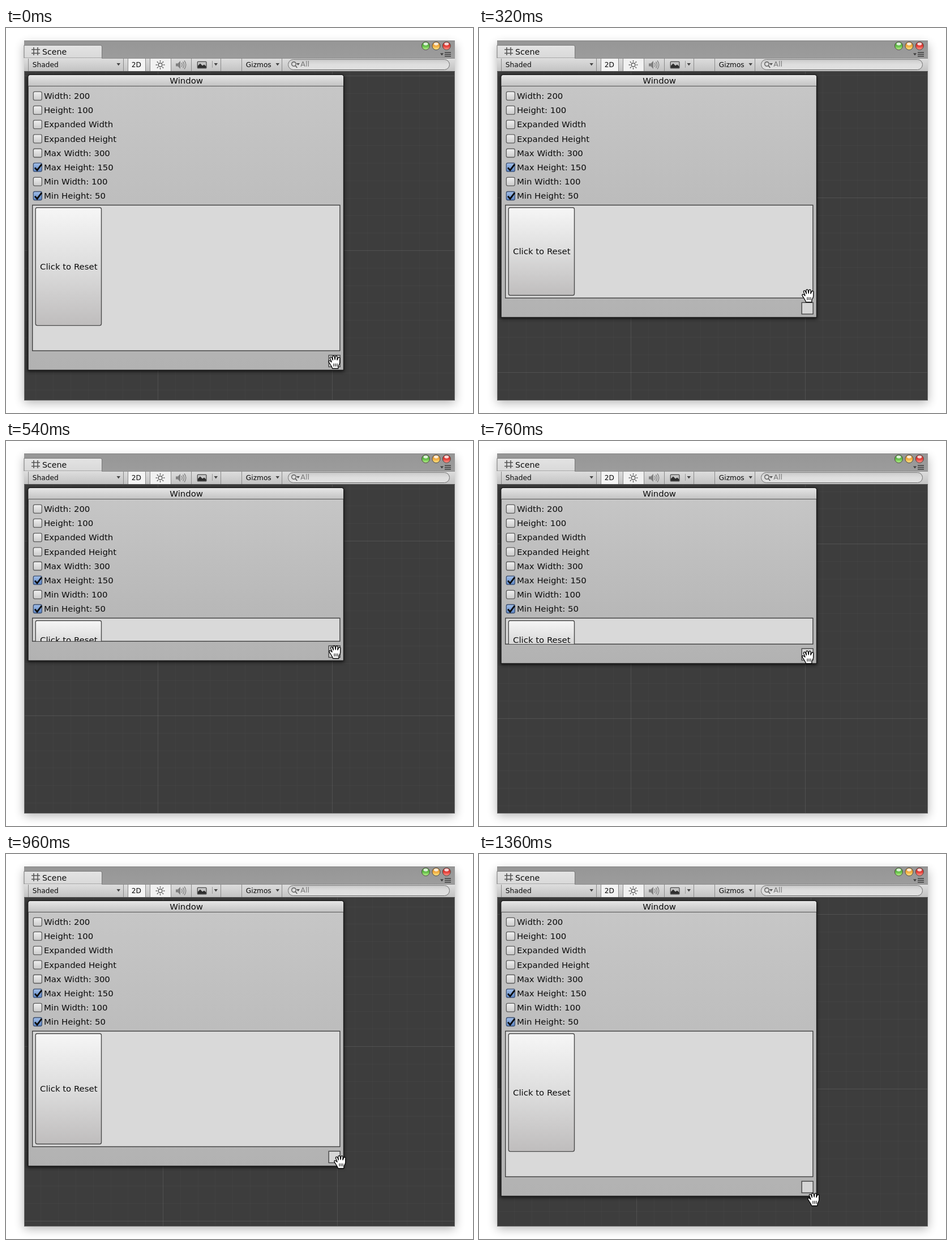
Recreate the animation shown at these times as an HTML page. Size 825x679 px, loop 1.38 s.

```html
<!DOCTYPE html>
<html lang="en">
<head>
<meta charset="utf-8">
<title>Resizable window</title>
<style>
  html, body { margin: 0; width: 100%; height: 100%; overflow: hidden; background: #fff; }
  svg { display: block; }
  text { font-family: "DejaVu Sans", Verdana, sans-serif; font-size: 14.9px; fill: #0c0c0c; }
  .tool text { font-size: 12.2px; }
  .mid { text-anchor: middle; }
  .sep { stroke: #8a8a8a; fill: none; }
  .icon { stroke: #5c5c5c; fill: none; }
</style>
</head>
<body>
<svg width="825" height="679" viewBox="0 0 825 679">
  <defs id="defs">
    <filter id="soft" x="-10%" y="-10%" width="120%" height="120%"><feGaussianBlur stdDeviation="9"/></filter>
    <filter id="near" x="-10%" y="-10%" width="120%" height="120%"><feGaussianBlur stdDeviation="3"/></filter>
    <clipPath id="scene"><rect x="33" y="77" width="759" height="579"/></clipPath>
    <clipPath id="boxClip"><rect id="clipRect" x="47" y="313" width="542" height="256"/></clipPath>
  </defs>

  <!-- outer frame -->
  <rect x="32" y="29" width="761" height="632" fill="#000" opacity=".3" filter="url(#soft)"/>
  <rect x="32" y="22" width="761" height="635" fill="#6c6c6c"/>
  <rect x="32" y="22" width="761" height="31" fill="url(#bar)"/>
  <path d="M32 22.5H793" stroke="#858585"/>
  <path d="M32 53V30.5H167Q169.5 30.5 169.5 33V53Z" fill="url(#tab)" stroke="#777"/>
  <path d="M49 34V48M56 34V48M45 38H60M45 44.5H60" stroke="#555" stroke-width="1.6"/>
  <text x="63.9" y="46.5" style="font-size:14.2px">Scene</text>
  <g id="lights"></g>
  <path d="M767 44.5h6l-3 4zM775 42.5h11v1.5h-11zM775 45.7h11v1.5h-11zM775 49h11v1.5h-11z" fill="#3c3c3c"/>

  <!-- toolbar -->
  <g class="tool">
    <rect x="32" y="53" width="761" height="23" fill="url(#tool)"/>
    <path d="M169 53.5H793" stroke="#8a8a8a"/>
    <rect x="216" y="54" width="30" height="22" fill="#f4f4f4"/>
    <rect x="255" y="54" width="36" height="22" fill="#f1f1f1"/>
    <path class="sep" d="M39.5 54V76M207.5 54V76M215.5 54V76M246.5 54V76M254.5 54V76M291.5 54V76M327.5 54V76M379.5 54V76M416.5 54V76M487.5 54V76"/>
    <path d="M364.5 58V70" stroke="#999"/>
    <path d="M195.5 62h6.5l-3.25 4.5zM367.5 62h6.5l-3.25 4.5zM476.5 62h6.5l-3.25 4.5z" fill="#444"/>
    <text x="46.8" y="69">Shaded</text>
    <text x="221.8" y="69">2D</text>
    <text x="423.8" y="69">Gizmos</text>
    <circle cx="272.5" cy="65" r="3.3" class="icon" stroke-width="1.4"/>
    <g id="rays" class="icon" stroke-width="1.4"></g>
    <path d="M300 62.500h3.500l4.500-4.500v14l-4.500-4.500h-3.500z" fill="#808080"/>
    <path fill="none" stroke="#808080" stroke-width="1.3" d="M310 61.5q2.500 3.500 0 7M312.500 59.5q4 5.500 0 11M315 57.500q5.500 7.500 0 15"/>
    <rect x="338.3" y="59.3" width="15.600" height="11.600" rx="1" fill="#c4c4c4" stroke="#4c4c4c" stroke-width="1.300"/>
    <path d="M339 70.500v-4l4-4 4 4 3-2 3.500 3v3z" fill="#2e2e2e"/>
    <rect x="498.5" y="55.5" width="285" height="18" rx="9" fill="url(#field)" stroke="#717171"/>
    <circle cx="508.5" cy="63.5" r="3.8" class="icon" stroke-width="1.4"/>
    <path class="icon" stroke-width="1.6" d="M511.3 66.5l3 3.5"/>
    <path d="M513 62h6l-3 4z" fill="#555"/>
    <text x="520.3" y="68" style="font-size:12.6px;fill:#777">All</text>
    <path d="M32 76.5H793" stroke="#505050"/>
  </g>

  <!-- scene view -->
  <g clip-path="url(#scene)">
    <rect x="33" y="77" width="759" height="579" fill="#3d3d3d"/>
    <path id="minor" stroke="#fff" stroke-opacity=".025"/>
    <path id="major" stroke="#fff" stroke-opacity=".1"/>
    <rect id="shade" x="38" y="84" width="559" height="523" fill="#000" opacity=".7" filter="url(#near)"/>
    <path id="body" fill="url(#panel)" stroke="#1c1c1c" stroke-width="1.4"/>
    <path d="M39.5 102.5V86.5Q39.5 83 43 83H592.5Q596 83 596 86.5V102.5Z" fill="url(#title)"/>
    <path d="M39 102.5H596" stroke="#555"/>
    <text class="mid" x="318.6" y="98">Window</text>
    <g id="options"></g>
    <rect id="box" x="46.7" y="312.4" width="543.2" fill="#d9d9d9" stroke="#3e3e3e" stroke-width="1.4"/>
    <g clip-path="url(#boxClip)">
      <rect id="button" x="52.2" y="316.8" width="116.3" rx="3" fill="url(#btn)" stroke="#4a4a4a" stroke-width="1.4"/>
      <text id="label" class="mid" x="110.8">Click to Reset</text>
    </g>
    <rect id="grip" x="570.2" width="20" height="20.3" fill="#d6d6d6" stroke="#444" stroke-width="1.4"/>
  </g>

  <g id="hand" stroke-linejoin="round" stroke-linecap="round">
    <path fill="#fff" stroke="#000" stroke-width="1.3" d="M-4.5 11.5C-4.5 9-7 6.5-8.5 3.8C-9.8 1.5-11.6 0-11-1.5C-10.3-3-8-2.5-6 .2C-6.2-3-9-6-8.6-7.6C-8-9.4-6-9.2-5-6.8L-3.6-3.3L-4.2-8.8C-4.2-11.3-1.2-11.6-.7-9.2L.1-4L.8-9.2C1.3-11.4 4.2-11 4.1-8.7L3.9-3.4L5.7-7.2C6.7-9 9.2-8.2 8.9-6.2C8.5-4 8.8-1.5 8.7 1C8.4 4 6.5 5.5 6 8L5.8 11.5Z"/>
    <path fill="none" stroke="#000" stroke-width="1.1" d="M-2 3V7.500M1 3V7.500M4 3V7.500"/>
  </g>
</svg>
<script>
const $ = id => document.getElementById(id);
const set = (id, attrs) => { for (const k in attrs) $(id).setAttribute(k, attrs[k]); };

// vertical gradients: id -> evenly spaced colours
const gradients = {
  bar: ['#969696', '#9c9c9c'],
  tab: ['#e3e3e3', '#d9d9d9'],
  tool: ['#dedede', '#c3c3c3'],
  field: ['#cbcbcb', '#dedede', '#e2e2e2'],
  panel: ['#c7c7c7', '#b2b2b2'],
  title: ['#e6e6e6', '#c2c2c2'],
  btn: ['#f6f6f6', '#dddddd', '#bfbdbd'],
  off: ['#f0f0f0', '#cacaca'],
  on: ['#a3bfe8', '#5c86c6'],
  green: ['#4f9a3c', '#5fbb45', '#b9f58c'],
  amber: ['#c98a3a', '#f0a83c', '#ffe98a'],
  red: ['#b53030', '#e23a34', '#ff9a90']
};
$('defs').innerHTML += Object.entries(gradients).map(([id, list]) =>
  `<linearGradient id="${id}" x2="0" y2="1">${list.map((c, i) =>
    `<stop offset="${i / (list.length - 1)}" stop-color="${c}"/>`).join('')}</linearGradient>`).join('');

$('lights').innerHTML = ['green', 'amber', 'red'].map((c, i) =>
  `<g transform="translate(${741.5 + i * 18.4} 31.5)">
    <circle r="7.1" fill="url(#${c})" stroke="#4e4a42"/>
    <ellipse cy="-3.400" rx="4" ry="2.600" fill="#fff" opacity=".8"/></g>`).join('');

$('rays').innerHTML = Array.from({ length: 8 }, (_, i) =>
  `<path d="M5.3 0H8" transform="translate(272.5 65) rotate(${i * 45})"/>`).join('');

const options = ['Width: 200', 'Height: 100', 'Expanded Width', 'Expanded Height',
  'Max Width: 300', 'Max Height: 150', 'Min Width: 100', 'Min Height: 50'];
$('options').innerHTML = options.map((name, i) => {
  const on = i === 5 || i === 7;
  return `<g transform="translate(0 ${(119.5 + i * 25.17).toFixed(2)})">
    <rect x="48.3" y="-7.2" width="15" height="15" rx="2.5" fill="url(#${on ? 'on' : 'off'})" stroke="${on ? '#3c4f70' : '#5e5e5e'}" stroke-width="1.3"/>
    ${on ? '<path d="M51 1l4 4.5 8-10.5" fill="none" stroke="#0b0b0b" stroke-width="2.8"/>' : ''}
    <text x="66.9" y="5.5">${name}</text></g>`;
}).join('');

// [ms, value] tracks
const handX = [[0, 581], [240, 582], [760, 582], [960, 591], [1120, 592], [1360, 592]];
const handY = [[0, 589], [110, 584], [240, 535], [400, 410], [500, 376], [620, 368],
  [760, 381], [960, 543], [1120, 604], [1360, 609]];
const gridX = [[0, 269], [780, 269], [960, 278], [1120, 279], [1360, 279]];
const gridY = [[0, 393], [130, 390], [240, 371], [400, 220], [510, 180], [640, 171],
  [760, 182], [960, 340], [1120, 408], [1360, 415]];

// monotone cubic interpolation
function at(track, t) {
  const last = track.length - 1;
  if (t >= track[last][0]) return track[last][1];
  const slope = i => (track[i + 1][1] - track[i][1]) / (track[i + 1][0] - track[i][0]);
  const tangent = i => {
    if (i === 0 || i === last) return 0;
    const a = slope(i - 1), b = slope(i);
    return a * b <= 0 ? 0 : 2 * a * b / (a + b);
  };
  let i = 0;
  while (t >= track[i + 1][0]) i++;
  const [t0, v0] = track[i], [t1, v1] = track[i + 1];
  const h = t1 - t0, u = (t - t0) / h, w = 1 - u;
  return w * w * (1 + 2 * u) * v0 + u * u * (3 - 2 * u) * v1 +
    u * w * h * (w * tangent(i) - u * tangent(i + 1));
}

function drawGrid(gx, gy) {
  const step = 30.8, d = { minor: '', major: '' };
  for (let k = -12; k <= 20; k++) {
    const kind = k % 10 ? 'minor' : 'major';
    const x = Math.round(gx + k * step) - 0.5, y = Math.round(gy + k * step) - 0.5;
    d[kind] += `M${x} 77V656M33 ${y}H792`;
  }
  for (const kind in d) set(kind, { d: d[kind] });
}

function draw(t) {
  const gy = Math.round(at(gridY, t));
  drawGrid(Math.round(at(gridX, t)), gy);

  const bottom = Math.min(603, gy + 210);
  const boxEnd = bottom - 34;
  const height = Math.max(69.5, Math.min(207.8, boxEnd - 4.5 - 316.8));
  set('shade', { height: bottom - 81 });
  set('body', { d: `M39 ${bottom + 0.5}V86.5Q39 82.5 43 82.5H592.5Q596.5 82.5 596.5 86.5V${bottom + 0.5}Z` });
  set('box', { height: boxEnd - 312.2 });
  set('clipRect', { height: boxEnd - 313 });
  set('button', { height });
  set('label', { y: 316.8 + height / 2 + 4.9 });
  set('grip', { y: bottom - 25.8 });
  set('hand', { transform: `translate(${Math.round(at(handX, t))} ${Math.round(at(handY, t))})` });
}

const start = performance.now();
function tick() {
  const t = (performance.now() - start) % 1380;
  draw(Math.floor(t / 20) * 20);
  requestAnimationFrame(tick);
}
tick();
</script>
</body>
</html>
```
